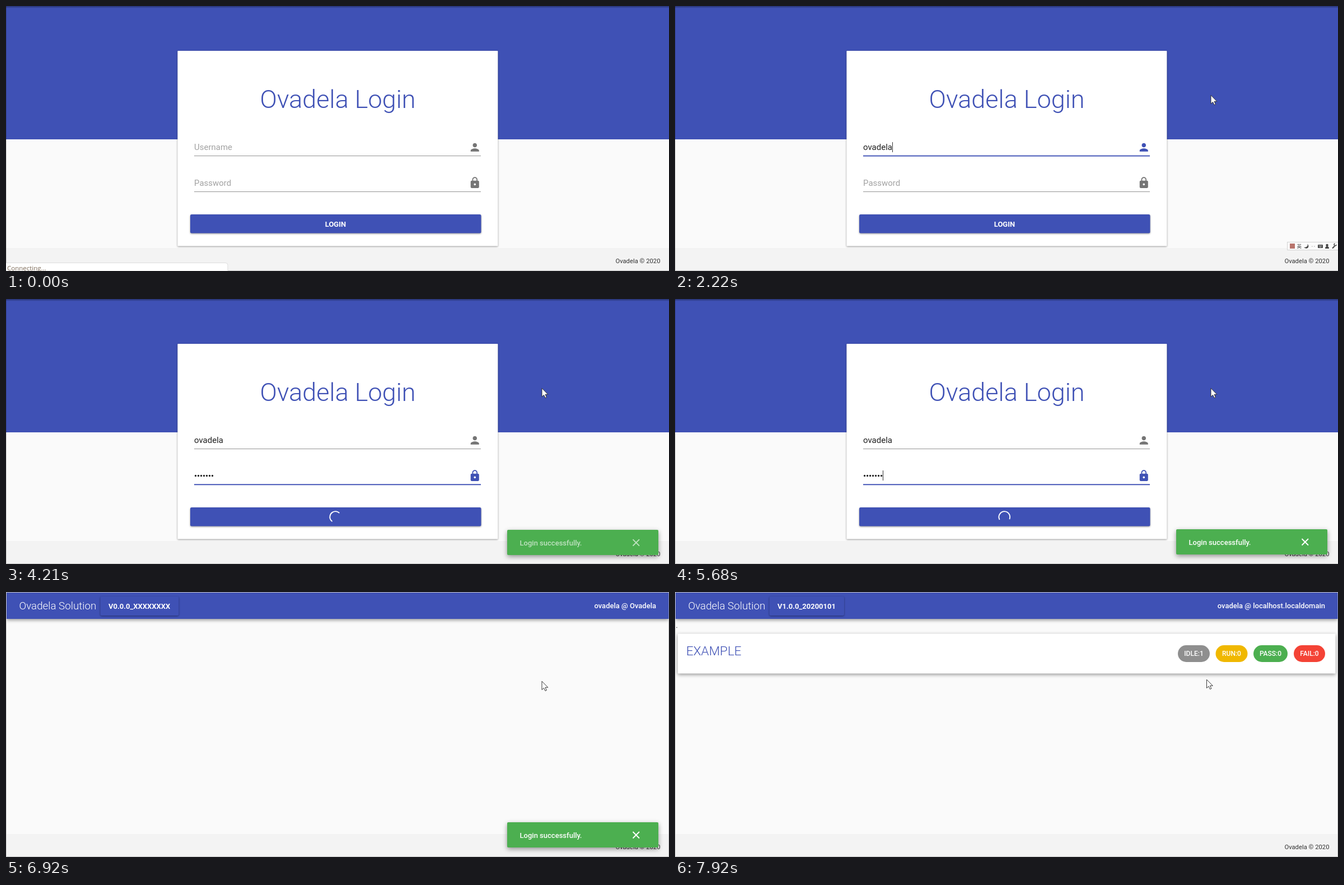
Write an HTML page that moves like this. It is 1184x473 px and loops after 8000 ms.

```html
<!DOCTYPE html>
<html lang="en">
<head>
<meta charset="utf-8">
<title>Login</title>
<style>
  html, body { margin: 0; width: 100%; height: 100%; overflow: hidden; background: #fafafa; }
  svg { display: block; width: 1184px; height: 473px; font-family: Roboto, sans-serif; }
  text { white-space: pre; }
  .blue { fill: #3f51b5; }
  .light { font-weight: 300; }
  .bold { font-weight: 700; font-size: 13px; fill: #fff; }
  .medium { font-weight: 500; font-size: 13px; fill: #fff; }
  .field { font-size: 15px; fill: #212121; }
  .hint { font-size: 15px; fill: #a2a2a2; }
  .raised { filter: drop-shadow(0 1px 1.5px rgba(0,0,0,.42)); }
  .lifted { filter: drop-shadow(0 2px 3px rgba(0,0,0,.42)); }
  .badge { font-weight: 500; font-size: 12px; fill: #fff; text-anchor: middle; }
</style>
</head>
<body>
<svg viewBox="0 0 1184 473">
  <defs>
    <linearGradient id="edge" x2="0" y2="1">
      <stop stop-color="#000" stop-opacity=".38"/>
      <stop offset="1" stop-color="#000" stop-opacity="0"/>
    </linearGradient>
  </defs>
  <rect width="1184" height="473" fill="#fafafa"/>
  <rect y="432" width="1184" height="41" fill="#f3f3f3"/>
  <text x="1168.5" y="458.5" font-size="11.25" fill="#333" text-anchor="end">Ovadela © 2020</text>

  <g id="login">
    <rect class="blue" width="1184" height="238"/>
    <rect width="1184" height="4" fill="url(#edge)"/>
    <rect class="raised" x="306.4" y="80" width="572" height="348.6" rx="1" fill="#fff"/>
    <text class="blue light" x="592.5" y="182" font-size="45" text-anchor="middle">Ovadela Login</text>

    <text id="userHint" class="hint" x="336" y="257">Username</text>
    <text id="userText" class="field" x="336" y="257"></text>
    <rect x="336" y="267" width="512" height="1" fill="#949494"/>
    <rect id="userLine" class="blue" y="266.6" height="1.9"/>
    <path id="userIcon" transform="translate(826 241) scale(.94)" d="M12 12c2.21 0 4-1.79 4-4s-1.79-4-4-4-4 1.79-4 4 1.79 4 4 4zm0 2c-2.67 0-8 1.34-8 4v2h16v-2c0-2.66-5.33-4-8-4z"/>

    <text id="passHint" class="hint" x="336" y="320.5">Password</text>
    <g id="dots" fill="#212121"></g>
    <rect x="336" y="331" width="512" height="1" fill="#949494"/>
    <rect id="passLine" class="blue" y="330.3" height="1.9"/>
    <path id="passIcon" transform="translate(826 304.2) scale(.94)" d="M18 8h-1V6c0-2.76-2.24-5-5-5S7 3.24 7 6v2H6c-1.1 0-2 .9-2 2v10c0 1.1.9 2 2 2h12c1.1 0 2-.9 2-2V10c0-1.1-.9-2-2-2zm-6 9c-1.1 0-2-.9-2-2s.9-2 2-2 2 .9 2 2-.9 2-2 2zm3.1-9H8.9V6c0-1.71 1.39-3.1 3.1-3.1 1.71 0 3.1 1.39 3.1 3.1v2z"/>
    <rect id="caret" width="1" height="18" fill="#333"/>

    <rect class="raised blue" x="329" y="372" width="519.5" height="33.4" rx="2.5"/>
    <text id="loginLabel" class="bold" x="588.5" y="393.7" text-anchor="middle">LOGIN</text>
    <circle id="spinner" r="20" fill="none" stroke="#fff" stroke-width="3.8" stroke-linecap="round"/>

    <g id="popup">
      <rect x="335.5" y="269.5" width="181" height="83" fill="#fff" stroke="#d0d0d0"/>
      <text class="field" x="345" y="291">ovadela</text>
    </g>
    <rect width="1" height="473" fill="#000" opacity=".2"/>
  </g>

  <g id="home">
    <rect class="lifted blue" x="1" y="1" width="1182.5" height="47"/>
    <text class="light" x="23.5" y="31" font-size="18.75" fill="#fff">Ovadela Solution</text>
    <rect id="versionBox" class="raised blue" x="168.5" y="8" height="34" rx="2.5"/>
    <text id="version" class="bold" x="183" y="29.5"></text>
    <text id="account" class="medium" x="1161" y="29.3" text-anchor="end"></text>
    <g id="panel">
      <text x="1.5" y="64" font-size="13" fill="#222">.</text>
      <rect class="lifted" x="5" y="74.5" width="1174.5" height="71" rx="1" fill="#fff"/>
      <text class="blue light" x="20" y="113.3" font-size="22.5">EXAMPLE</text>
      <g id="badges"></g>
    </g>
    <path d="M0 .5H1184M.5 0V473M1183.5 48V473" stroke="#c6c6c6" fill="none"/>
  </g>
  <path d="M0 472.5H1184" stroke="#c2c2c2"/>

  <g id="status">
    <path d="M0 458.5H392q4 0 4 4V473H0z" fill="#fff" stroke="#ddd"/>
    <text x="2" y="472.3" font-size="11.5" fill="#7d6b58" font-family="'Open Sans', 'Noto Sans', sans-serif">Connecting...</text>
  </g>

  <g id="ime" fill="#444">
    <rect x="1093.5" y="421.5" width="92" height="14" fill="#fbfbfb" stroke="#d2d2d2"/>
    <rect x="1098" y="424" width="9" height="9" fill="#b8746c"/>
    <text x="1110.5" y="432" font-size="8.5" font-family="'Noto Sans CJK SC', 'Noto Sans CJK', sans-serif">英</text>
    <path d="M1129.5 424.5q2 6.5-6.5 6.5q6 4 8.300-1q.8-3-1.800-5.500z"/>
    <path d="M1137 429h1.500M1141 429h1.500" stroke="#bbb" stroke-width="1.5"/>
    <rect x="1148" y="426" width="9" height="6" rx="1"/>
    <path d="M1149.500 428h6M1150.500 430.300h4" stroke="#fff" stroke-width=".8"/>
    <circle cx="1164.500" cy="427" r="2.200"/>
    <path d="M1161 433q0-4 3.500-4t3.500 4z"/>
    <path d="M1174 432.500l4-4" stroke="#444" stroke-width="2"/>
    <path d="M1181 426a2 2 0 1 1-2.500-2" fill="none" stroke="#444" stroke-width="1.500"/>
  </g>

  <g id="toast">
    <rect x="895" y="411" width="270" height="45" rx="2" fill="#4caf50" style="filter:drop-shadow(0 3px 4px rgba(0,0,0,.4))"/>
    <g id="toastText">
      <text x="917.500" y="438.500" font-size="13" font-weight="500" fill="#fff">Login successfully.</text>
      <path d="M1119.500 428l11.500 11.500m0-11.500l-11.500 11.500" stroke="#fff" stroke-width="1.900"/>
    </g>
  </g>

  <path id="cursor" d="M0 0V15.200L3.500 12L6 17.200L8.400 16.100L6 11H10.800z" fill="#fff" stroke="#222" stroke-width=".9"/>
</svg>
<script>
const $ = id => document.getElementById(id);
const LOOP = 8000;
const NAME = 'ovadela';
const userKeys = [1520, 1600, 1750, 1910, 2060, 2140, 2220];
const passKeys = [2680, 2830, 3000, 3070, 3250, 3420, 3490];
const SUBMIT = 3810, TOAST_IN = 3890, HOME = 6850, LOADED = 6990, TOAST_OUT = 6960;

const clamp = x => Math.max(0, Math.min(1, x));
const span = (t, start, length) => clamp((t - start) / length);
const mix = (a, b, k) => a + (b - a) * k;
const easeOut = (k, power) => 1 - (1 - k) ** power;
const show = (id, on) => { $(id).style.display = on ? '' : 'none'; };
const typed = (keys, t) => keys.filter(k => k <= t).length;

// CSS ease-in-out: cubic-bezier(.42, 0, .58, 1)
function easeInOut(x) {
  let lo = 0, hi = 1, s;
  for (let i = 0; i < 20; i++) {
    s = (lo + hi) / 2;
    if (1.26 * s * (1 - s) ** 2 + 1.74 * s * s * (1 - s) + s ** 3 < x) lo = s; else hi = s;
  }
  return s * s * (3 - 2 * s);
}

$('dots').innerHTML = passKeys.map((_, i) =>
  `<circle cx="${338.6 + 5 * i}" cy="315.5" r="1.65"/>`).join('');
$('badges').innerHTML = [
  ['IDLE:1', 898, 57, '#8f8f8f'], ['RUN:0', 965.5, 57, '#f0b800'],
  ['PASS:0', 1033, 61, '#4caf50'], ['FAIL:0', 1105, 56, '#f44336']
].map(([label, x, w, color]) =>
  `<rect x="${x}" y="95" width="${w}" height="30" rx="15" fill="${color}"/>
   <text class="badge" x="${x + w / 2}" y="114.3">${label}</text>`).join('');

function drawFocus(field, grow, amount) {
  const width = 512 * grow;
  $(field + 'Line').setAttribute('x', 592 - width / 2);
  $(field + 'Line').setAttribute('width', width);
  $(field + 'Line').style.opacity = amount;
  const rgb = [63, 81, 181].map(c => mix(117, c, amount));
  $(field + 'Icon').style.fill = `rgb(${rgb})`;
}

function drawFields(t) {
  const focusUser = span(t, 810, 300), focusPass = span(t, 2520, 300);
  drawFocus('user', easeOut(focusUser, 2), focusUser * (1 - focusPass));
  drawFocus('pass', easeOut(focusPass, 2), focusPass);

  const letters = typed(userKeys, t), dots = typed(passKeys, t);
  $('userText').textContent = NAME.slice(0, letters);
  show('userHint', !letters);
  show('passHint', !dots);
  [...$('dots').children].forEach((dot, i) => { dot.style.display = i < dots ? '' : 'none'; });
  show('popup', t >= 1600 && t < 1910);

  const inPass = t >= 2520;
  const blink = t < 3490 || Math.floor((t - 3490) / 500) % 2 === 0;
  show('caret', t >= 810 && (t < 1300 || t >= 1520) && blink);
  const x = inPass ? 336 + 5 * dots : 336 + (letters ? $('userText').getComputedTextLength() : 0);
  $('caret').setAttribute('x', Math.round(x));
  $('caret').setAttribute('y', inPass ? 306 : 243);
}

function drawSpinner(t) {
  show('loginLabel', t < SUBMIT);
  show('spinner', t >= SUBMIT);
  const phase = Math.max(0, t - SUBMIT) / 1400 % 1;
  const grow = easeInOut(clamp(phase * 2)), shrink = easeInOut(clamp(phase * 2 - 1));
  const spinner = $('spinner');
  spinner.setAttribute('stroke-dasharray', `${1 + 99 * grow} 200`);
  spinner.setAttribute('stroke-dashoffset', -15 * grow - 110 * shrink);
  spinner.setAttribute('transform', `translate(588.3 389) scale(.493) rotate(${360 * phase})`);
}

function drawHome(t) {
  const loaded = t >= LOADED;
  $('version').textContent = loaded ? 'V1.0.0_20200101' : 'V0.0.0_XXXXXXXX';
  $('versionBox').setAttribute('width', loaded ? 133.5 : 140);
  $('account').textContent = NAME + (loaded ? ' @ localhost.localdomain' : ' @ Ovadela');
  show('panel', loaded);
}

function drawToast(t) {
  const enter = span(t, TOAST_IN, 500), leave = span(t, TOAST_OUT, 260);
  show('toast', enter > 0 && leave < 1);
  const shift = 66 * (1 - easeOut(enter, 4) + easeOut(leave, 2));
  $('toast').setAttribute('transform', `translate(0 ${shift})`);
  $('toastText').style.opacity = enter;
}

function drawCursor(t) {
  show('cursor', t >= 70);
  const k = easeOut(span(t, 70, 510), 2);
  const curve = (a, b, c) => mix(mix(a, b, k), mix(b, c, k), k);
  const [x, y] = t < 7920 ? [curve(1080, 1010, 957), curve(460, 80, 159.3)] : [949.5, 156.3];
  $('cursor').setAttribute('transform', `translate(${x} ${y})`);
}

function draw(now) {
  const t = now % LOOP;
  show('login', t < HOME);
  show('home', t >= HOME);
  show('ime', t >= 810 && t < 2520);
  $('status').style.opacity = 1 - span(t, 70, 220);
  drawFields(t);
  drawSpinner(t);
  drawHome(t);
  drawToast(t);
  drawCursor(t);
}

const begin = performance.now();
function tick() {
  draw(performance.now() - begin);
  requestAnimationFrame(tick);
}
tick();
</script>
</body>
</html>
```
